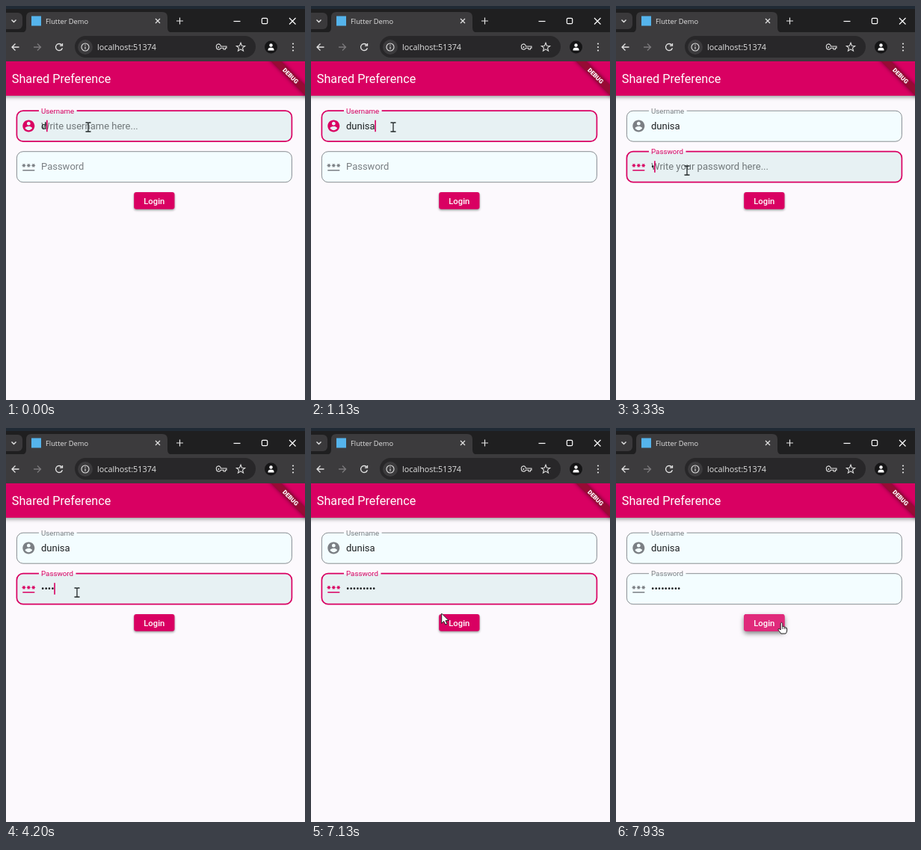
An HTML page with a canvas for the animation above (8 s loop, 400 by 527 pixels).

```html
<!DOCTYPE html>
<html lang="en">
<head>
<meta charset="utf-8">
<title>Login form</title>
<style>
html, body { margin: 0; width: 100%; height: 100%; overflow: hidden; background: #fcf9fd; }
canvas { display: block; width: 400px; height: 527px; }
</style>
</head>
<body>
<canvas id="stage"></canvas>
<script>
const LOOP = 8000;
const canvas = document.getElementById('stage');
const dpr = window.devicePixelRatio || 1;
canvas.width = 400 * dpr;
canvas.height = 527 * dpr;
const c = canvas.getContext('2d');

const PINK = [217, 0, 98], GREY = [108, 114, 118], LABEL = [122, 126, 130];
const LIGHT = '#f3fdff', HOVER = '#e7f1f3';
const ROBOTO = 'Roboto, sans-serif', UI = '"Open Sans", sans-serif';

const accountIcon = new Path2D('M12 2C6.48 2 2 6.48 2 12s4.48 10 10 10 10-4.48 10-10S17.52 2 12 2zm0 3c1.66 0 3 1.34 3 3s-1.34 3-3 3-3-1.34-3-3 1.34-3 3-3zm0 14.2c-2.5 0-4.71-1.28-6-3.22.03-1.99 4-3.08 6-3.08 1.99 0 5.97 1.09 6 3.08-1.29 1.94-3.5 3.22-6 3.22z');
const asterisk = 'm.85-2.95.85-1.48.85 1.48 1.3-.75-.85-1.48h1.7v-1.5h-1.7l.85-1.47-1.3-.75-.85 1.47-.85-1.47-1.3.75.85 1.47h-1.7v1.5h1.7l-.85 1.48z';
const passwordIcon = new Path2D('M2 17h20v2H2z' + [2.3, 10.3, 18.3].map(x => `M${x} 15.9${asterisk}`).join(''));
const arrow = new Path2D('M0 0V13.2L3 10.4L5.1 15L7.4 14L5.3 9.5H9.4Z');
const hand = new Path2D('M-1.3 1.2Q0-.8 1.3 1.2V6L2 5.4Q3.4 5 3.7 6.5Q5.2 5.6 5.6 7.2Q7 6.8 7.2 8.2V11Q7 13.4 5.5 15H-.8Q-2.4 12.6-4.4 10.2Q-5 8.6-3.4 8.4L-1.3 10Z');

const clamp = x => Math.max(0, Math.min(1, x));
const lerp = (a, b, p) => a + (b - a) * p;
const smooth = x => { x = clamp(x); return x * x * (3 - 2 * x); };
const mix = (a, b, p) => `rgb(${a.map((v, i) => Math.round(lerp(v, b[i], p)))})`;
const count = (keys, t) => keys.filter(k => t >= k).length;
const within = (t, a, b) => t >= a && t < b;

function text(s, x, y, size, color, family = ROBOTO, weight = 400, align = 'left') {
  c.font = `${weight} ${size}px ${family}`;
  c.fillStyle = color;
  c.textAlign = align;
  c.fillText(s, x, y);
}
function box(x, y, w, h, r, fill) {
  c.beginPath();
  c.roundRect(x, y, w, h, r);
  c.fillStyle = fill;
  c.fill();
}
function disc(x, y, r, fill) {
  box(x - r, y - r, 2 * r, 2 * r, r, fill);
}
function stroke(path, color, width = 1.2) {
  c.strokeStyle = color;
  c.lineWidth = width;
  c.stroke(new Path2D(path));
}
function shadow(alpha, blur, dy) {
  c.shadowColor = `rgba(0,0,0,${alpha})`;
  c.shadowBlur = blur * dpr;
  c.shadowOffsetY = dy * dpr;
}
function at(x, y, scale, draw) {
  c.save();
  c.translate(x, y);
  c.scale(scale, scale);
  draw();
  c.restore();
}

function browser() {
  const ink = '#e3e3e3';
  c.fillStyle = '#1f1f20';
  c.fillRect(0, 0, 400, 36);
  c.fillStyle = '#202a35';
  c.fillRect(0, 0, 400, 4);
  box(-6, 9, 28, 22, 6, '#3a393b');
  stroke('M7.5 18.5L10.5 21.5L13.5 18.5', ink, 1.4);
  c.fillStyle = '#3c3b3d';
  c.fill(new Path2D('M20 36Q27 36 27 29V15Q27 8 34 8H209Q216 8 216 15V29Q216 36 223 36Z'));
  c.fillRect(0, 35, 400, 39);
  box(34, 13.5, 13, 13, 0, '#55b4ec');
  text('Flutter Demo', 53, 23.8, 9.3, ink, UI);
  stroke('M200 17L206 23M206 17L200 23', ink);
  stroke('M228 20H237M232.5 15.5V24.5', ink);
  stroke('M304.5 20.5H313.5', '#fff');
  c.strokeStyle = '#fff';
  c.beginPath();
  c.roundRect(342.3, 16.3, 7.4, 7.4, 1.5);
  c.stroke();
  stroke('M379 16L387.500 24.500M387.500 16L379 24.500', '#fff');

  stroke('M17.500 55H8.500M12.500 50.500L8 55L12.500 59.500', ink, 1.3);
  stroke('M37 55H46M42 50.500L46.500 55L42 59.500', '#7b7a7c', 1.3);
  stroke('M74.600 52.200A4.500 4.500 0 1 0 75.400 56.200M75.500 50V53.200H72', ink, 1.3);
  box(92, 40, 242, 29, 14.5, '#282729');
  disc(106, 55, 10, '#3c3b3d');
  stroke('M101 55A5 5 0 1 1 111 55A5 5 0 1 1 101 55M106 54.200V57.800M106 51.800V53', ink, 1.1);
  text('localhost:51374', 122, 58.8, 10.8, ink, UI);
  stroke('M281.500 55A3 3 0 1 1 287.300 54H295V56.200H293.500V58H291V56.200H287.300A3 3 0 0 1 281.500 55', ink, 1.1);
  disc(284.4, 55, 1, ink);
  let star = '';
  for (let i = 0; i < 10; i++) {
    const r = i % 2 ? 2.6 : 6, a = i * Math.PI / 5;
    star += `${i ? 'L' : 'M'}${314 + r * Math.sin(a)} ${55.3 - r * Math.cos(a)}`;
  }
  stroke(star + 'Z', ink, 1.1);
  disc(354.500, 55, 8.5, '#151516');
  disc(354.500, 52.500, 2.2, '#fff');
  box(350.500, 55.700, 8, 3.800, [3, 3, 0, 0], '#fff');
  for (const y of [50.5, 55, 59.5]) disc(384, y, 1.1, ink);
}

function appBar() {
  c.save();
  c.beginPath();
  c.rect(0, 74, 400, 453);
  c.clip();
  shadow(.4, 5, 2);
  c.fillStyle = mix(PINK, PINK, 0);
  c.fillRect(-10, 74, 420, 46);
  shadow(0, 0, 0);
  text('Shared Preference', 7.8, 103.2, 16.2, '#fff');
  c.translate(400, 74);
  c.rotate(Math.PI / 4);
  shadow(.5, 5, 0);
  c.fillStyle = '#970b35';
  c.fillRect(-40, 22.4, 80, 9.6);
  shadow(0, 0, 0);
  text('DEBUG', 0, 30.2, 8.1, '#fff', ROBOTO, 900, 'center');
  c.restore();
}

// focus and float run from 0 to 1; y is the top edge of the outline
function field(f) {
  const { y, focus, float } = f;
  const w = lerp(.8, 1.7, focus);
  box(14.4, y, 368, 41, 8.5, f.hover ? HOVER : LIGHT);

  c.font = `400 9.75px ${ROBOTO}`;
  const gap = (c.measureText(f.label).width + 6.4) * float;
  const mid = 44 + (c.measureText(f.label).width + 6.4) / 2;
  c.save();
  c.beginPath();
  c.rect(0, y - 5, 400, 60);
  c.rect(mid - gap / 2, y - 5, gap, 10);
  c.clip('evenodd');
  c.beginPath();
  c.roundRect(14.4, y, 368, 41, 8.5);
  c.strokeStyle = mix(GREY, PINK, focus);
  c.lineWidth = w;
  c.stroke();
  c.restore();

  at(20.7, y + 10.6, .8, () => {
    c.fillStyle = f.active ? mix(PINK, PINK, 0) : '#7b7f84';
    c.fill(f.icon, 'evenodd');
  });
  const base = y + 24.7;
  text(f.label, 47, lerp(base, y + 3.4, float), lerp(13, 9.75, float), mix(LABEL, PINK, focus));
  if (f.hint > 0) {
    c.globalAlpha = f.hint;
    text(f.placeholder, 47, base, 13, '#707779');
    c.globalAlpha = 1;
  }
  text(f.value, 47, base, 13, '#1d2022');
  if (f.caret) {
    c.fillStyle = mix(PINK, PINK, 0);
    c.fillRect(46.7 + c.measureText(f.value).width, y + 12.5, 1.6, 15.5);
  }
}

function button(hover, press) {
  shadow(lerp(.4, .5, hover), lerp(3, 6, hover), lerp(1.5, 3, hover));
  box(171.2, 249, 54.3, 22.8, 3.2, mix(PINK, [220, 18, 110], hover));
  shadow(0, 0, 0);
  if (press > 0) {
    c.save();
    c.clip();
    disc(lerp(221, 198, press), 260.5, 45 * press, '#e02a7b');
    c.restore();
  }
  text('Login', 198.3, 264.7, 11.3, '#fff', ROBOTO, 500, 'center');
}

const route = [[1930, 110, 162], [2130, 104, 182], [2330, 95, 220], [6960, 95, 220],
  [7060, 132, 228], [7130, 174.5, 248], [7260, 204, 258], [7460, 221.5, 260]];
function pointer(t) {
  const i = route.findIndex(k => k[0] > t);
  if (i === 0) return route[0].slice(1);
  if (i < 0) return route[route.length - 1].slice(1);
  const [a, x, y] = route[i - 1], [b, u, v] = route[i];
  const p = (t - a) / (b - a);
  return [lerp(x, u, p), lerp(y, v, p)];
}
function target([x, y]) {
  if (y > 140 && y < 181) return 'user';
  if (y > 195 && y < 236) return 'pass';
  return x > 171 && x < 226 && y > 248 && y < 272 ? 'button' : '';
}

function cursor(t) {
  const pos = pointer(t), [x, y] = pos, over = target(pos);
  at(x, y, 1, () => {
    if (over === 'user' || over === 'pass') {
      const beam = 'M-3.5-6H-1Q0-6 0-5Q0-6 1-6H3.500M0-5V5M-3.500 6H-1Q0 6 0 5Q0 6 1 6H3.500';
      stroke(beam, '#22282a', 1.3);
      return;
    }
    const shape = over === 'button' && t > 7200 ? hand : arrow;
    c.fillStyle = '#fff';
    c.fill(shape);
    c.strokeStyle = '#222';
    c.lineWidth = 1;
    c.stroke(shape);
    if (shape === hand) stroke('M1.300 6V9M3.700 6.500V9M5.600 7.200V9.200', '#222', .8);
  });
}

const NAME = 'dunisa';
const nameKeys = [0, 270, 470, 670, 930, 1130];
const passKeys = [3330, 3800, 4000, 4200, 5330, 5800, 5930, 6070, 6270];
const SWITCH = 2390, LEAVE = 7600;

function draw(t) {
  c.setTransform(dpr, 0, 0, dpr, 0, 0);
  c.fillStyle = '#fcf9fd';
  c.fillRect(0, 0, 400, 527);
  appBar();
  browser();

  const over = target(pointer(t - 65));
  const moved = smooth((t - SWITCH - 15) / 167);
  const left = smooth((t - LEAVE) / 167);
  field({
    y: 140.2, label: 'Username', placeholder: 'Write username here...', icon: accountIcon,
    value: NAME.slice(0, count(nameKeys, t)), hint: t < 70 ? 1 : 0,
    active: t < SWITCH, caret: t < SWITCH, hover: over === 'user', focus: 1 - moved, float: 1
  });
  field({
    y: 194.7, label: 'Password', placeholder: 'Write your password here...', icon: passwordIcon,
    value: '•'.repeat(count(passKeys, t)), hint: t < 3730 ? smooth((t - 2500) / 150) : 0,
    active: within(t, SWITCH, LEAVE),
    caret: within(t, SWITCH, LEAVE) && !within(t, 2900, 3330) && !within(t, 6800, 7330),
    hover: over === 'pass', focus: moved * (1 - left), float: moved
  });
  button(smooth((t - 7200) / 200), smooth((t - LEAVE) / 320));
  cursor(t);
}

const start = performance.now();
function frame() {
  draw((performance.now() - start) % LOOP);
  requestAnimationFrame(frame);
}
frame();
</script>
</body>
</html>
```
